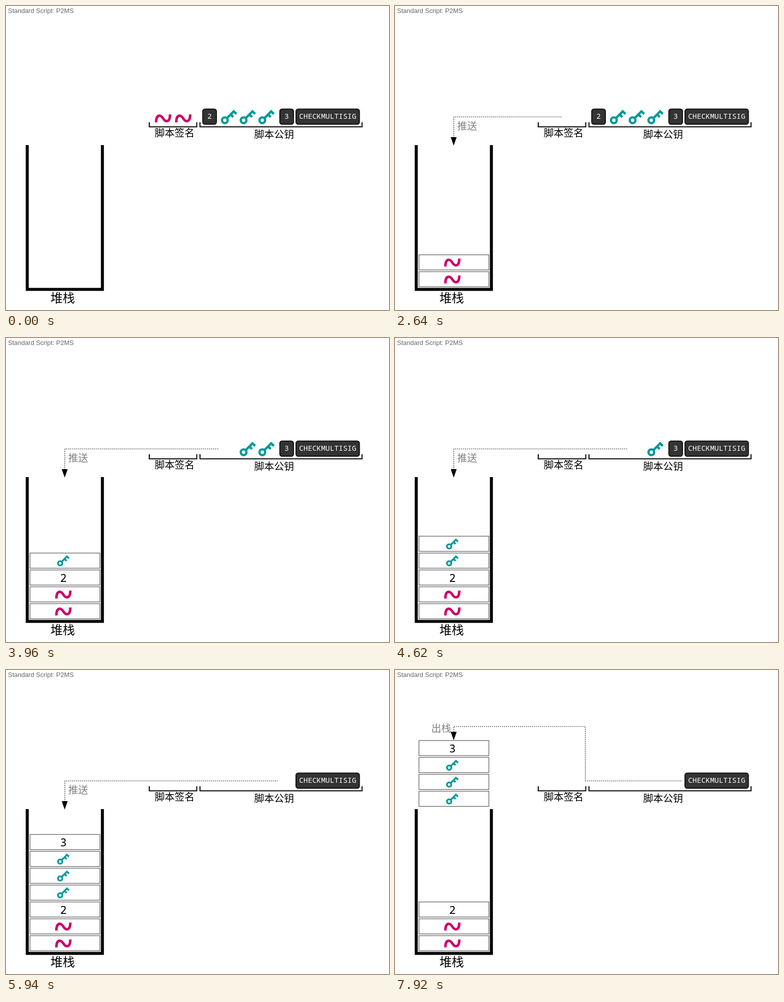
Animation of 770 by 612 pixels, one loop 8 s. Source, as an HTML page:

```html
<!DOCTYPE html>
<html lang="zh-CN">
<head>
<meta charset="utf-8">
<title>Standard Script: P2MS</title>
<style>
  html, body { margin: 0; width: 100%; height: 100%; overflow: hidden; background: #fff; }
  svg { display: block; font-family: "Noto Sans CJK SC", "Noto Sans CJK", sans-serif; font-size: 20px; }
  .mono { font-family: "Noto Sans Mono", monospace; text-anchor: middle; }
  .line { fill: none; stroke: #000; stroke-width: 2; }
  .op { fill: #333; stroke: #111; stroke-width: 2; }
  .cell { fill: #fff; stroke: #555; stroke-width: 1.2; }
</style>
</head>
<body>
<svg width="770" height="612" viewBox="0 0 770 612">
  <defs>
    <path id="sig" fill="none" stroke="#c06" stroke-width="5"
      d="M2.5 16C2.5 7 5 2.5 9.5 2.5C16 2.5 17 13.5 23.5 13.5C28 13.5 30.5 9 30.5 0"/>
    <g id="key" fill="none" stroke="#099" stroke-width="4.6">
      <circle cx="9" cy="22" r="5.7"/>
      <path d="M13 18L27.6 3.4M25 2.5L32.3 9.2M20.5 10.5L26 15.5"/>
    </g>
  </defs>
  <text x="4" y="14" fill="#666" style="font: 13px 'Liberation Sans', sans-serif">Standard Script: P2MS</text>
  <path class="line" d="M288 234V243.3H383.5V234M390 234V243.3H715.8V234"/>
  <text x="299" y="263">脚本签名</text>
  <text x="499" y="266">脚本公钥</text>
  <path class="line" stroke-width="6" style="stroke-width:6" d="M42.7 280V570.6H193.8V280"/>
  <text x="89.5" y="597" font-size="24.5">堆栈</text>
  <g id="scene"></g>
</svg>
<script>
const STEP = 660, LOOP = 8000;
const scene = document.getElementById("scene");

// Script items in order: kind, left edge, arrow end while being pushed
const items = [
  ["sig", 299.3, 294], ["sig", 339.8, 335], ["2", 395.5, 387],
  ["key", 431, 427], ["key", 468.7, 467], ["key", 506.3, 504], ["3", 550.5, 546]
];

const use = (id, x, y, scale = 1) =>
  `<use href="#${id}" transform="translate(${x} ${y}) scale(${scale})"/>`;

const mono = (s, x, y, size, fill) =>
  `<text class="mono" x="${x}" y="${y}" font-size="${size}" fill="${fill}">${s}</text>`;

const op = (s, x, w) =>
  `<rect class="op" x="${x}" y="207.5" width="${w}" height="30.5" rx="4.5"/>` +
  mono(s, x + w / 2, 227, 14.75, "#fff");

function scriptItem([kind, x]) {
  if (kind === "sig") return use("sig", x, 218.3);
  if (kind === "key") return use("key", x, 208);
  return op(kind, x, 27.5);
}

function cell(kind, y) {
  const mark = kind === "sig" ? use("sig", 98.8, y + 7.7)
    : kind === "key" ? use("key", 102, y + 3.8, 0.765)
    : mono(kind, 115.3, y + 23.8, 22, "#000");
  return `<rect class="cell" x="48.2" y="${y}" width="140.5" height="30.5"/>` + mark;
}

const arrow = (path, tip, label, x, y) =>
  `<path class="line" style="stroke-width:1.1" stroke-dasharray="2 2" d="${path}"/>
   <path d="M112 ${tip - 17}h12l-6 17z"/>
   <text x="${x}" y="${y}" fill="#808080">${label}</text>`;

function draw(step) {
  const pushed = Math.max(0, Math.min(7, step - 2));
  const popped = step === 11 ? 1 : step === 12 ? 4 : 0;
  let out = op("CHECKMULTISIG", 583, 127.5);
  items.forEach((item, i) => {
    if (i >= pushed) out += scriptItem(item);
    else out += cell(item[0], i < 7 - popped ? 534.8 - i * 33.95 : 244 - (i - 7 + popped) * 34);
  });
  if (popped === 1) out += arrow("M118 223.2H578", 243.5, "出栈", 72, 233);
  else if (popped) out += arrow("M118.3 125V113.8H382.5V223.2H578", 141.5, "出栈", 73, 125);
  else if (pushed) out += arrow(`M118.3 265V223.2H${items[pushed - 1][2]}`, 281, "推送", 125, 249);
  scene.innerHTML = out;
}

let shown = -1;
function tick(now) {
  const step = Math.floor(now % LOOP / STEP);
  if (step !== shown) draw(shown = step);
  requestAnimationFrame(tick);
}
draw(0);
requestAnimationFrame(tick);
</script>
</body>
</html>
```
